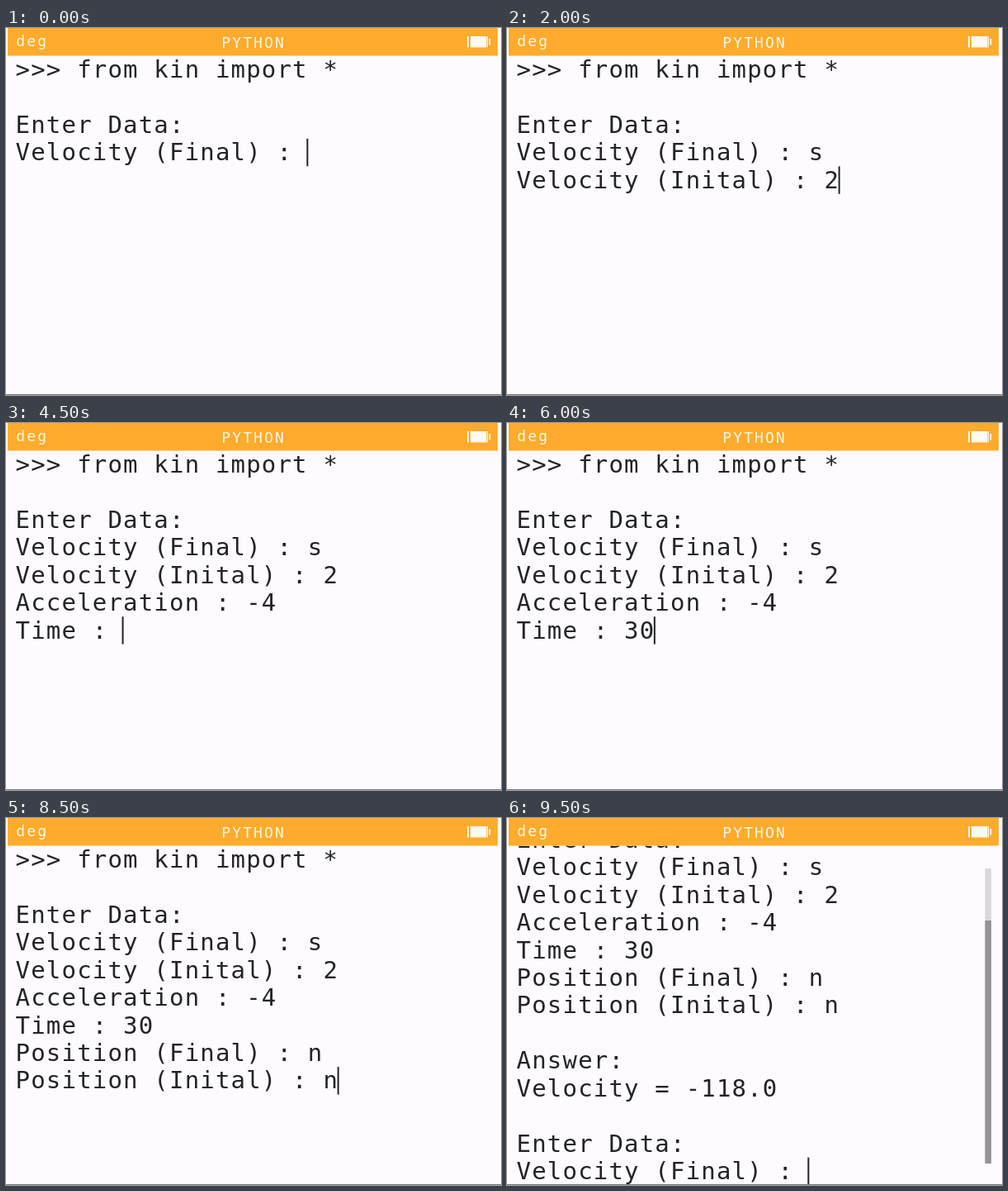
These frames come from a looping animation (600x444 px, 9.7 s). An HTML page:

```html
<!DOCTYPE html>
<html lang="en">
<head>
<meta charset="utf-8">
<title>Python shell</title>
<style>
  html, body { margin: 0; width: 100%; height: 100%; overflow: hidden; background: #fdfbff; }
  svg { display: block; width: 600px; height: 444px; }
  text { font-family: "DejaVu Sans Mono", "Noto Sans Mono", monospace; white-space: pre; }
  #lines text { font-size: 29px; letter-spacing: 1.18px; fill: #242326; }
  #header text { font-size: 18px; letter-spacing: 2.1px; fill: #fff6e6; }
</style>
</head>
<body>
<svg viewBox="0 0 600 444">
  <rect width="600" height="444" fill="#fdfbff"/>
  <g id="console">
    <g id="lines"></g>
    <rect id="cursor" width="2" height="33.4" fill="#242326"/>
  </g>
  <g id="scrollbar">
    <rect x="579.5" y="61" width="7.5" height="357" fill="#d9d7da"/>
    <rect x="579.5" y="124" width="7.5" height="294" fill="#959397"/>
  </g>
  <g id="header">
    <rect width="600" height="33.5" fill="#fdfbff"/>
    <rect x="2" width="594" height="33.5" fill="#ffab2d"/>
    <text x="12.3" y="22">deg</text>
    <text x="261.3" y="23.5">PYTHON</text>
    <g fill="#fffaf2">
      <rect x="559" y="10" width="2" height="13.5"/>
      <rect x="563" y="10" width="19" height="13.5"/>
      <rect x="582.6" y="10" width="1.4" height="13.5"/>
      <rect x="585.4" y="13" width="1.8" height="7.5"/>
    </g>
  </g>
  <rect y="443" width="600" height="1" fill="#77757a"/>
</svg>
<script>
const LOOP = 9700, CELL = 18.65, PITCH = 33.45, LEFT = 11, TOP = 33.5;
const RESULT_TIME = 8700, SCROLL = 91;

const intro = '>>> from kin import *\n\nEnter Data:\nVelocity (Final) : ';
// [time in ms, text added to the console]
const output = [
  [0, intro],
  [400, 's'],
  [500, '\nVelocity (Inital) : '],
  [2000, '2'],
  [2300, '\nAcceleration : '],
  [3800, '-'],
  [4000, '4'],
  [4200, '\nTime : '],
  [5400, '3'],
  [6000, '0'],
  [6200, '\nPosition (Final) : '],
  [7700, 'n'],
  [7800, '\nPosition (Inital) : '],
  [8300, 'n'],
  [RESULT_TIME, '\n\nAnswer:\nVelocity = -118.0\n\nEnter Data:\nVelocity (Final) : ']
];

const byId = id => document.getElementById(id);
const rows = Array.from({ length: 15 }, (_, i) => {
  const row = document.createElementNS('http://www.w3.org/2000/svg', 'text');
  row.setAttribute('x', LEFT + 0.6);
  row.setAttribute('y', TOP + PITCH * i + 26.3);
  byId('lines').append(row);
  return row;
});

let shown = null;

function render(time) {
  const content = output.filter(([at]) => at <= time).map(([, text]) => text).join('');
  if (content === shown) return;
  shown = content;

  const lines = content.split('\n');
  const last = lines.length - 1;
  rows.forEach((row, i) => { row.textContent = lines[i] || ''; });
  byId('cursor').setAttribute('x', LEFT + CELL * lines[last].length - 1);
  byId('cursor').setAttribute('y', TOP + PITCH * last);

  const scrolled = time >= RESULT_TIME;
  byId('console').setAttribute('transform', `translate(0 ${scrolled ? -SCROLL : 0})`);
  byId('scrollbar').setAttribute('visibility', scrolled ? 'visible' : 'hidden');
}

const start = performance.now();
function tick() {
  render((performance.now() - start) % LOOP);
  requestAnimationFrame(tick);
}
tick();
</script>
</body>
</html>
```
